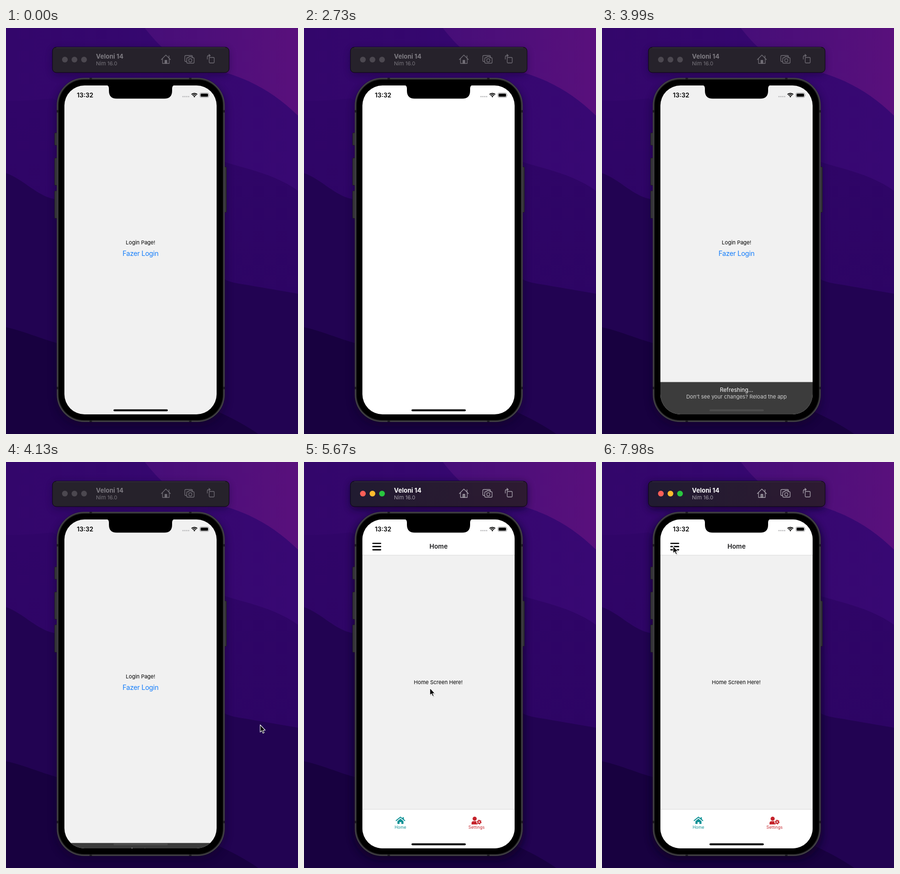
Animation of 610 by 848 pixels, one loop 8000 ms. Source, as an HTML page:

```html
<!DOCTYPE html>
<html lang="pt">
<head>
<meta charset="utf-8">
<title>Login demo</title>
<style>
  html, body { margin: 0; width: 100%; height: 100%; overflow: hidden; background: #24045a; }
  svg { display: block; width: 100vw; height: 100vh; }
  text { font-family: Inter, Roboto, "Liberation Sans", sans-serif; font-size: 11px; }
  .mid { text-anchor: middle; }
  .link { font-size: 14.2px; letter-spacing: -.3px; fill: #157efb; }
  .title { font-size: 13.4px; font-weight: 600; fill: #1c1c1e; }
  .tab { font-size: 8.6px; letter-spacing: .1px; }
  .clock { font-size: 13px; font-weight: 600; }
  .name { font-size: 13px; font-weight: 700; fill: #7f7c83; }
  .sub { fill: #78757c; }
  .icons { fill: none; stroke: #716e76; stroke-width: 1.3; stroke-linejoin: round; stroke-linecap: round; }
  .lights { fill: #4c4850; }
  .shade { opacity: .4; }
  .on .name { fill: #fff; }
  .on .sub { fill: #a49fa9; }
  .on .icons { stroke: #a8a2ad; }
  .on .shade { opacity: .75; }
  .on .bar { fill: url(#barOn); }
  .on .red { fill: #fe5f58; }
  .on .amber { fill: #febb2e; }
  .on .green { fill: #29c73f; }
</style>
</head>
<body>
<svg id="stage" viewBox="0 0 610 848" preserveAspectRatio="none">
  <defs>
    <linearGradient id="base" x1="0" y1="0" x2="1" y2="0">
      <stop offset="0" stop-color="#33066b"/><stop offset="1" stop-color="#380873"/>
    </linearGradient>
    <linearGradient id="glow" x1="0" y1="0" x2="1" y2="0">
      <stop offset="0" stop-color="#460e78"/><stop offset="1" stop-color="#59107c"/>
    </linearGradient>
    <linearGradient id="deep" x1="0" y1="0" x2="0" y2="1">
      <stop offset="0" stop-color="#300568"/><stop offset="1" stop-color="#2b0462"/>
    </linearGradient>
    <linearGradient id="barOn">
      <stop offset="0" stop-color="#211b31"/><stop offset="1" stop-color="#2d1a31"/>
    </linearGradient>
    <filter id="blur" x="-20%" y="-20%" width="140%" height="140%"><feGaussianBlur stdDeviation="8"/></filter>
    <clipPath id="glass"><rect x="122" y="120" width="318" height="687" rx="42"/></clipPath>
  </defs>

  <g id="wallpaper">
    <rect width="610" height="848" fill="url(#base)"/>
    <path d="M290 0C320 38 345 64 400 79C490 96 550 125 610 183V0Z" fill="url(#glow)"/>
    <path d="M0 152Q50 153 97 147C200 200 340 250 457 280C510 296 565 307 610 340V848H0Z" fill="url(#deep)"/>
    <path d="M0 303C35 316 60 345 92 355C230 390 380 480 457 525Q468 532 500 536L610 555V848H0Z" fill="#220352"/>
    <path d="M0 625C40 634 70 648 106 658C250 700 360 760 457 808Q495 826 527 848H0Z" fill="#180140"/>
  </g>

  <g id="window">
    <g class="shade" filter="url(#blur)" fill="#0b0120">
      <rect x="98" y="44" width="367" height="54" rx="9"/>
      <rect x="103" y="110" width="357" height="722" rx="58"/>
    </g>
    <rect class="bar" x="97" y="40" width="369" height="53" rx="8" fill="#26222b" stroke="#0a0610"/>
    <path d="M105 41H458" stroke="#5b5562" stroke-opacity=".5"/>
    <g class="lights">
      <circle class="red" cx="123" cy="66" r="6"/>
      <circle class="amber" cx="143" cy="66" r="6"/>
      <circle class="green" cx="163" cy="66" r="6"/>
    </g>
    <text class="name" x="188" y="64">Veloni 14</text>
    <text class="sub" x="188" y="78">Nim 16.0</text>
    <g class="icons">
      <path d="M324.5 66L334 56.5L343.500 66M327 64V74H341V64M340.500 62.500V58"/>
      <path d="M332 74V67.500H336V74Z" fill="#716e76"/>
      <path d="M377 70H375.500Q373.500 70 373.500 68V59.500Q373.500 57.500 375.500 57.500H387.500Q389.500 57.500 389.500 59.500V60.500"/>
      <path d="M379.500 62H381L382.500 60H387.500L389 62H391Q393 62 393 64V71.500Q393 73.500 391 73.500H379.500Q377.500 73.500 377.500 71.500V64Q377.500 62 379.500 62Z"/>
      <circle cx="385" cy="67.500" r="3.300"/>
      <rect x="424.500" y="61.500" width="10.500" height="11.500" rx="1.500"/>
      <path d="M420.500 65V61Q420.500 57.500 424 57.500H426.500M424 55L426.700 57.500L424 60"/>
    </g>

    <g fill="#333237" stroke="#1a191d" stroke-width=".8">
      <rect x="101.500" y="219" width="6" height="26" rx="1.500"/>
      <rect x="101.500" y="271.500" width="6" height="57" rx="1.500"/>
      <rect x="101.500" y="340" width="6" height="57.500" rx="1.500"/>
      <rect x="455" y="290" width="5.500" height="95" rx="1.500"/>
    </g>
    <rect x="106" y="104" width="351" height="719" rx="57" fill="#29282b"/>
    <rect x="107.300" y="105.300" width="348.400" height="716.400" rx="56" fill="none" stroke="#4a494d" stroke-width="1.600"/>
    <path d="M177 104v4M385 104v4M177 819v4M385 819v4M106 174h4M453 174h4M106 752h4M453 752h4" stroke="#1c1b1f" stroke-width="5"/>
    <rect x="110" y="108" width="343" height="711" rx="53"/>
  </g>

  <g clip-path="url(#glass)">
    <rect id="paper" x="122" y="120" width="318" height="687" fill="#f1f1f1"/>

    <g id="login">
      <text class="mid" x="281" y="452">Login Page!</text>
      <text class="mid link" x="281" y="476">Fazer Login</text>
    </g>

    <circle id="splash" cx="281" cy="463.500" r="38" fill="#f0f0f2"/>

    <g id="home">
      <path d="M122 120H440V194H122ZM122 726H440V807H122Z" fill="#fff"/>
      <path d="M122 194.500H440M122 725.500H440" stroke="#dcdcdc"/>
      <path d="M144 170H160M144 176.700H160M144 183.300H160" stroke="#000" stroke-width="2.700" stroke-linecap="round"/>
      <text class="mid title" x="281" y="181">Home</text>
      <text class="mid" x="280.500" y="463.500">Home Screen Here!</text>
      <g fill="#0f9296">
        <path d="M192.500 749L201.500 741.800L210.500 749" fill="none" stroke="#0f9296" stroke-width="2" stroke-linecap="round" stroke-linejoin="round"/>
        <path d="M206 742H208.500V747L206 745ZM201.500 745L207.800 750.200V756H203.400V752H199.600V756H195.200V750.200Z"/>
        <text class="mid tab" x="201.500" y="766">Home</text>
      </g>
      <g fill="#c5232b">
        <circle cx="356.500" cy="745" r="4.300"/>
        <path d="M350 757V754.500Q350 750.300 354.200 750.300H360Q361 755 364 757Z"/>
        <circle cx="366" cy="752" r="5.800" fill="#fff"/>
        <circle cx="366" cy="752" r="2.700" fill="none" stroke="#c5232b" stroke-width="2.200"/>
        <circle cx="366" cy="752" r="4.200" fill="none" stroke="#c5232b" stroke-width="1.500" stroke-dasharray="2.200"/>
        <text class="mid tab" x="360.500" y="766">Settings</text>
      </g>
    </g>

    <g id="status">
      <text class="clock" x="148" y="145">13:32</text>
      <path d="M368.500 143.300H383" stroke="#bdbdbf" stroke-width="2.600" stroke-dasharray="2.600 1.300"/>
      <g fill="none" stroke="#000" stroke-width="2">
        <path d="M387.600 138.800A8.400 8.400 0 0 1 399.400 138.800M389.800 141A5.200 5.200 0 0 1 397.200 141"/>
      </g>
      <path d="M393.500 145L391.400 142.700A3 3 0 0 1 395.600 142.700Z"/>
      <rect x="405" y="135.500" width="18.500" height="9.500" rx="2.800" fill="none" stroke="#8d8d8f" stroke-width=".9"/>
      <rect x="406.500" y="137" width="15.500" height="6.500" rx="1.500"/>
      <path d="M424.500 138.700Q426 140.200 424.500 141.800Z" fill="#8d8d8f"/>
    </g>

    <rect id="pill" x="224.500" y="796.500" width="113.500" height="4" rx="2"/>
    <g id="banner">
      <rect x="122" y="739.500" width="318" height="130" fill="#3c3c3c"/>
      <text class="mid" x="281" y="759.500" fill="#fff" style="font-size:11.700px">Refreshing...</text>
      <text class="mid" x="281" y="773.500" fill="#d0d0d0">Don't see your changes? Reload the app</text>
    </g>
    <rect id="ghost" x="224.500" y="796.500" width="113.500" height="4" rx="2" fill="#4d4d4d"/>
  </g>
  <path d="M209 119Q215 120 215 126V131Q215 147.500 231 147.500H331Q347 147.500 347 131V126Q347 120 353 119Z"/>

  <g id="ring" fill="none">
    <circle cx="263" cy="473" r="20" stroke="#f1f1f1" stroke-width="8"/>
    <circle cx="263" cy="473" r="19.800" stroke="#000" stroke-width="2.800"/>
  </g>
  <g id="cursor">
    <path d="M1 2V17L4.500 14L6.500 19L9.500 18L7.300 13H12Z" opacity=".18"/>
    <path d="M0 0V15.200L3.500 12.100L5.800 17.500L8.300 16.400L6 11.200H10.500Z" stroke="#fff" stroke-width="1.100" stroke-linejoin="round"/>
  </g>
</svg>

<script>
const LOOP = 8000, TICK = 70;
const el = id => document.getElementById(id);
const show = (id, on) => { el(id).style.display = on ? "" : "none"; };
const within = (t, from, to) => t >= from && t < to;
const clamp = x => Math.min(1, Math.max(0, x));
const ease = x => x < .5 ? 2 * x * x : 1 - 2 * (1 - x) * (1 - x);

// Pointer stops: time, x, y, eased flag for the leg leading to it
const path = [
  [4130, 531, 549], [4200, 500, 505], [4270, 430, 432], [4340, 355, 395],
  [4410, 305, 410], [4480, 280, 445], [4550, 265, 475], [4620, 260, 485],
  [4690, 260, 485], [4830, 260, 478], [4900, 260, 478], [4970, 255, 474],
  [5040, 259, 470], [5110, 263, 472], [6020, 263, 472], [6440, 354, 690, 1],
  [6650, 354, 690], [6720, 360, 691], [7000, 365, 703, 1], [7490, 365, 703],
  [7980, 148.5, 175.5, 1]
];

function pointer(t) {
  const i = path.findIndex(p => p[0] > t);
  if (i < 0) return path[path.length - 1].slice(1, 3);
  const a = path[Math.max(0, i - 1)], b = path[i];
  let k = clamp((t - a[0]) / (b[0] - a[0]));
  if (b[3]) k = ease(k);
  return [a[1] + (b[1] - a[1]) * k, a[2] + (b[2] - a[2]) * k];
}

function draw(t) {
  const blank = within(t, 1750, 2870);
  const home = t >= 5600;
  el("paper").setAttribute("fill", blank ? "#fff" : "#f1f1f1");
  show("login", !blank && !home);
  show("home", home);
  show("splash", within(t, 2170, 2730));
  el("splash").style.opacity = t >= 2660 ? .5 : 1;

  const drop = 122 * ease(clamp((t - 4058) / 150));
  const banner = within(t, 2870, 4200);
  show("banner", banner);
  show("ghost", banner);
  show("pill", !banner);
  el("banner").setAttribute("transform", `translate(0 ${drop})`);

  el("window").setAttribute("class", t >= 5320 ? "on" : "");
  show("ring", within(t, 5250, 5390));
  show("cursor", t >= 4130);
  el("cursor").setAttribute("transform", `translate(${pointer(t)})`);
}

let start;
function frame(now) {
  start ??= now;
  const t = (now - start) % LOOP;
  draw(Math.floor(t / TICK + 1e-6) * TICK);
  requestAnimationFrame(frame);
}
draw(0);
requestAnimationFrame(frame);
</script>
</body>
</html>
```
